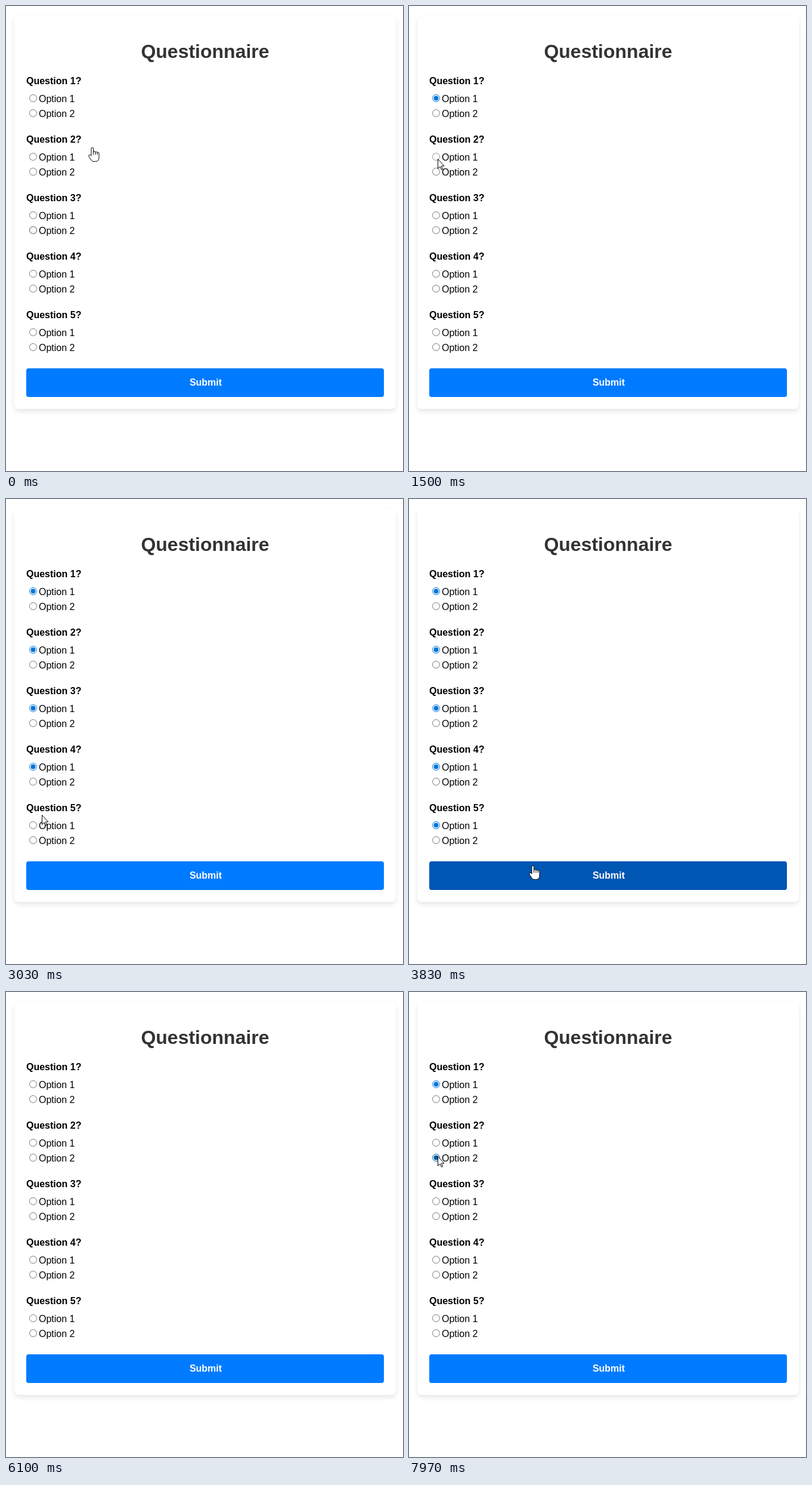
Animation of 666 by 779 pixels, one loop 8 s. Source, as an HTML page:

```html
<!DOCTYPE html>
<html lang="en">
<head>
<meta charset="utf-8">
<title>Questionnaire</title>
<style>
  html, body { margin: 0; width: 100%; height: 100%; overflow: hidden; background: #fff; }
  #card {
    position: absolute; left: 14px; top: 17px; width: 640px; height: 658px;
    border-radius: 8px; background: #fff; box-shadow: 0 4px 8px rgba(0, 0, 0, .1);
  }
  svg { position: absolute; left: 0; top: 0; }
  text { font: 16px "Liberation Sans", Arial, sans-serif; }
  .bold { font-weight: bold; }
  .cursor { fill: #fff; stroke: #000; stroke-width: 1; stroke-linejoin: round; }
</style>
</head>
<body>
<div id="card"></div>
<svg id="stage" width="666" height="779" viewBox="0 0 666 779"></svg>
<script>
const LOOP = 8000;
const FIRST_MOVE = 30, SCORE = 4230, LEAVE = 4470, GONE = 4770, RELOAD = 6100, RETURN = 6330;
const PRESS = 100, LAG = 20, GLIDE = 350, SLOW_GLIDE = 740, BOW = 20;
const RADIO_X = 45.5, RADIO_REACH = 6.5, LABEL_X = 52;

const stage = document.getElementById('stage');
const card = document.getElementById('card');
const radioY = (q, o) => 154.5 + 98 * q + 25 * o;

function add(tag, attrs, content = '') {
  const node = document.createElementNS('http://www.w3.org/2000/svg', tag);
  for (const key in attrs) node.setAttribute(key, attrs[key]);
  node.textContent = content;
  return stage.appendChild(node);
}

function show(node, visible) {
  node.setAttribute('visibility', visible ? 'visible' : 'hidden');
}

add('text', { x: 334, y: 87, class: 'bold', fill: '#333', 'text-anchor': 'middle', style: 'font-size:32px' }, 'Questionnaire');

const radios = [];
for (let q = 0; q < 5; q++) {
  add('text', { x: 34, y: 131 + 98 * q, class: 'bold' }, `Question ${q + 1}?`);
  for (let o = 0; o < 2; o++) {
    const y = radioY(q, o);
    radios.push({
      q, o, y,
      ring: add('circle', { cx: RADIO_X, cy: y, r: 6, fill: '#fff' }),
      dot: add('circle', { cx: RADIO_X, cy: y, r: 4 })
    });
    add('text', { x: 55, y: y + 6.5 }, `Option ${o + 1}`);
  }
}

const button = add('rect', { x: 34, y: 607, width: 600, height: 48, rx: 4 });
add('text', { x: 335, y: 636, class: 'bold', fill: '#fff', 'text-anchor': 'middle' }, 'Submit');
const score = add('text', { x: 34, y: 707, class: 'bold', style: 'font-size:24px' }, 'Your Score: 3');

const arrow = add('path', { class: 'cursor', d: 'M.5.5V16.3L4.2 12.9 6.5 18.3 8.6 17.4 6.4 12H11Z' });
const hand = add('path', {
  class: 'cursor',
  d: 'M-2 13V2a1.8 1.8 0 0 1 3.6 0V8q0-1.5 1.7-1.5T5 8.3q0-1.2 1.6-1.2T8.2 9q0-1 1.4-1T11 10V17' +
     'Q11 23.5 4.5 23.5H2Q-.5 23.5-2 21L-6 15Q-7 13-5 12.3-3.5 12-2 14ZM1.6 8v4M5 8.3v4M8.2 9v3'
});

// First option down the form, then a second attempt after the reload
const firstTry = [560, 1600, 2170, 2870, 3670].map((at, q) => ({ at, q, o: 0 }));
const secondTry = [7200, 7970].map((at, q) => ({ at, q, o: q }));
const picks = [...firstTry, ...secondTry];

// The pointer aims beside a radio, leaning toward the middle of its pair
const aim = ({ q, o }) => [RADIO_X + 2.5, radioY(q, o) + (o ? -3 : 3)];
const move = (start, point, duration = GLIDE) => ({ start, point, duration });
const visit = (tries, start, duration) => tries.map((pick, i) =>
  i ? move(tries[i - 1].at + LAG, aim(pick)) : move(start, aim(pick), duration));

const moves = [
  move(-GLIDE, [145, 237]),
  ...visit(firstTry, FIRST_MOVE),
  move(firstTry[4].at + LAG, [235, 632]),
  move(LEAVE, [20, 281]),
  move(RELOAD - GLIDE, [105, 266]),
  ...visit(secondTry, RETURN, SLOW_GLIDE)
];

function pointerAt(t) {
  const i = moves.findLastIndex(m => m.start <= t);
  const { start, point: [x1, y1], duration } = moves[i];
  const [x0, y0] = moves[Math.max(0, i - 1)].point;
  const eased = 1 - (1 - Math.min(1, (t - start) / duration)) ** 3;
  const bow = BOW * Math.sin(Math.PI * eased);
  return [Math.round(x0 + (x1 - x0) * eased + bow), Math.round(y0 + (y1 - y0) * eased)];
}

function draw(t) {
  const present = t < GONE || t >= RETURN;
  const [x, y] = pointerAt(t);
  const inForm = present && x >= 34 && x <= 634;
  const overButton = inForm && y >= 607 && y < 655;
  const pressing = picks.some(({ at }) => t >= at - PRESS && t < at);
  const pageStart = t < RELOAD ? 0 : RELOAD;
  let overRow = false;

  for (const { q, o, y: cy, ring, dot } of radios) {
    const checked = picks.some(p => p.at >= pageStart && p.at <= t && p.q === q && p.o === o);
    // Until the first move, the row the pointer came from stays highlighted
    const hover = t < FIRST_MOVE ? q === 2 && o === 1 : inForm && Math.abs(y - cy) <= RADIO_REACH;
    overRow ||= hover;
    const color = checked ? (hover ? '#005a9e' : '#0075d7')
      : !hover ? '#767676' : pressing ? '#8d8d8d' : '#4f4f4f';
    ring.setAttribute('stroke', color);
    dot.setAttribute('fill', color);
    show(dot, checked);
  }

  const scored = t >= SCORE && t < RELOAD;
  show(score, scored);
  card.style.height = (scored ? 736 : 658) + 'px';
  button.setAttribute('fill', overButton ? '#0056b3' : '#007bff');

  const pointing = overButton || (overRow && x > LABEL_X);
  show(hand, present && pointing);
  show(arrow, present && !pointing);
  (pointing ? hand : arrow).setAttribute('transform', `translate(${x} ${y})`);
}

const begin = performance.now();
function frame() {
  draw((performance.now() - begin) % LOOP);
  requestAnimationFrame(frame);
}
frame();
</script>
</body>
</html>
```
